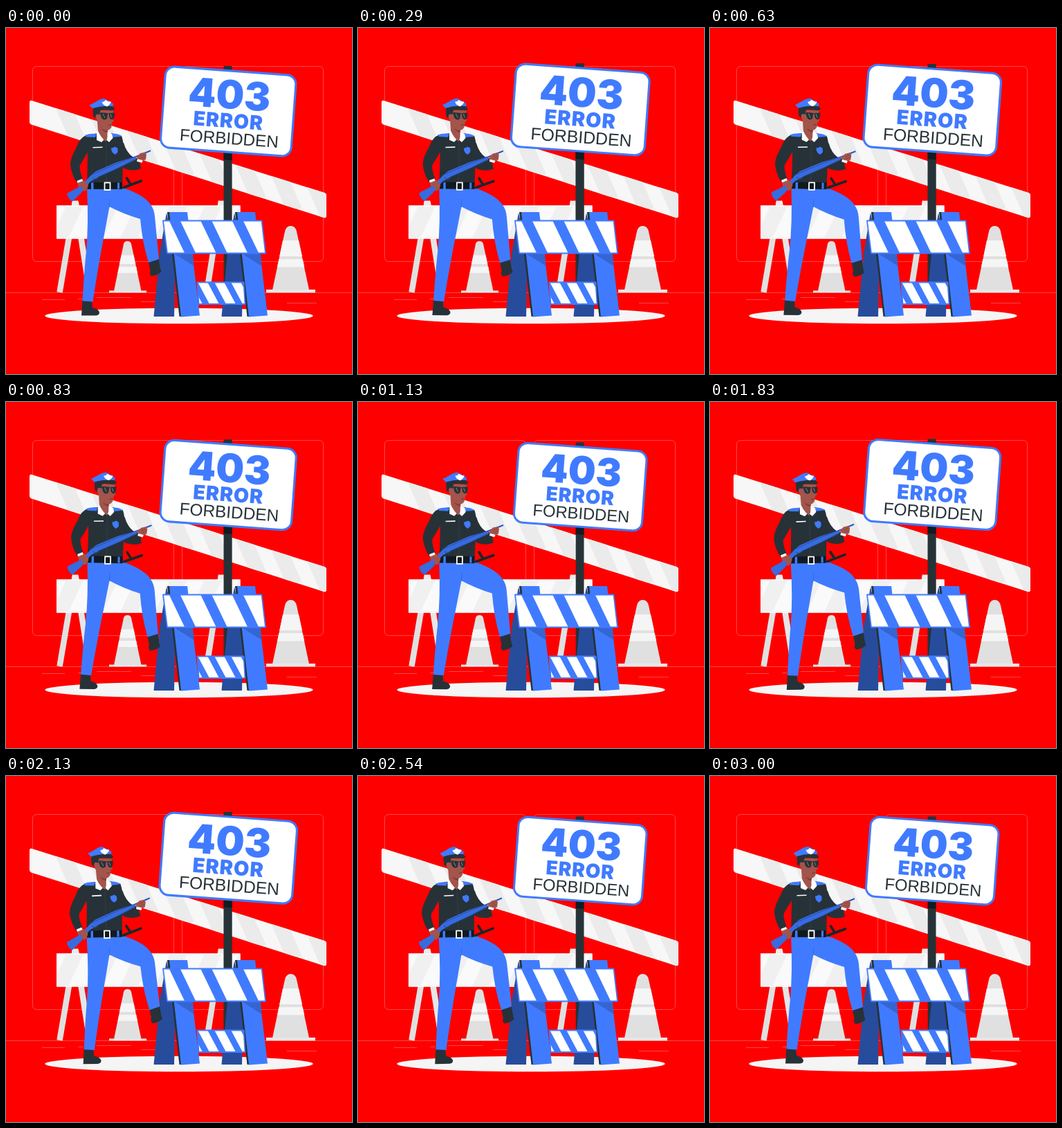
Animation of 500 by 500 pixels, one loop 3.04 s. Source, as an HTML page with a canvas:

```html
<!DOCTYPE html>
<html lang="en">
<head>
<meta charset="utf-8">
<title>403 Error Forbidden</title>
<style>
html, body { margin: 0; width: 100%; height: 100%; overflow: hidden; background: #f00; }
canvas { display: block; width: 100vw; height: 100vh; }
</style>
</head>
<body>
<canvas id="stage" width="500" height="500"></canvas>
<script>
const ctx = document.getElementById('stage').getContext('2d');
const BLUE = '#407bff', NAVY = '#284c9c', SHADE = '#3565d0', DARK = '#263238', SKIN = '#a3544b';
const PALE = '#f7f7f7', GREY = '#ebebeb', WHITE = '#fff';
const FRAME = 1000 / 24, LOOP = 3040;

function fill(color, d) {
  ctx.fillStyle = color;
  ctx.fill(new Path2D(d));
}

function line(color, width, d, cap = 'butt') {
  ctx.strokeStyle = color;
  ctx.lineWidth = width;
  ctx.lineCap = cap;
  ctx.lineJoin = 'round';
  ctx.stroke(new Path2D(d));
}

function clipped(d, draw) {
  ctx.save();
  ctx.clip(new Path2D(d));
  draw();
  ctx.restore();
}

// Slanted bands starting at x, one every `step`
function bands(color, x, step, count, width, top, bottom, lean, drop = 0) {
  for (let i = 0; i < count; i++) {
    const a = x + i * step, y = i * step * drop;
    fill(color, `M${a},${top + y} h${width} L${a + width + lean},${bottom + y} h${-width}Z`);
  }
}

function around(x, y, draw, scale, angle) {
  ctx.save();
  ctx.translate(x, y);
  ctx.rotate(angle * Math.PI / 180);
  ctx.scale(scale, scale);
  ctx.translate(-x, -y);
  draw();
  ctx.restore();
}

// Piecewise linear value through [position, value] stops
function tween(stops, p) {
  for (let i = 1; i < stops.length; i++) {
    const [p0, v0] = stops[i - 1], [p1, v1] = stops[i];
    if (p <= p1) return v0 + (v1 - v0) * (p - p0) / (p1 - p0);
  }
  return stops[stops.length - 1][1];
}

function backdrop() {
  ctx.fillStyle = '#f00';
  ctx.fillRect(0, 0, 500, 500);
  ctx.strokeStyle = 'rgba(235,235,235,.3)';
  ctx.lineWidth = 1;
  for (const x of [38.5, 254.5]) {
    ctx.beginPath();
    ctx.roundRect(x, 55.5, 204, 282, 5.5);
    ctx.stroke();
  }
  line('rgba(235,235,235,.3)', 1,
    'M0,382.5H500M52,392.5h33M104,391.5h7M131,389.5h50M195,395.5h36M406,397.5h43');
  fill('#f5f5f5', 'M56.2,416a193.8,11.3 0 1 0 387.6,0a193.8,11.3 0 1 0 -387.6,0Z');
}

function boom() {
  const shape = 'M37.5,105 L460,238 Q463,239 463,242 V271 Q463,275 459,274 L36.5,139.5 Q34,138.5 34,136 V108 Q34,104 37.5,105Z';
  fill(PALE, shape);
  clipped(shape, () => bands(GREY, 70, 52, 8, 24, 112, 162, 22, .317));
}

function backBarrier() {
  line('#e0e0e0', 8.5, 'M100,250L77.5,382M311,250L290,382');
  line('#e6e6e6', 8.5, 'M100,250L121,382M311,250L333,382');
  fill(GREY, 'M95.7,251q4,-3 9,0l2,9h-11ZM306.7,251q4,-3 9,0l2,9h-11Z');
  fill('#f0f0f0', 'M73,256.5H338.5V304.5H73Z');
  clipped('M75,258.5H336.5V302.5H75Z', () => bands('#fafafa', 62, 50, 6, 25, 257, 304, -22));
  line('#fafafa', 1.5, 'M73.8,257.2H337.8V303.8H73.8Z');
}

function cones() {
  fill('#e0e0e0', 'M156,380L170,312Q171,308 175.5,308Q180,308 181,312L195.5,380Z');
  fill('#f5f5f5', 'M166.5,328.5H184.6L187.2,341H164ZM163.3,345H188.2L190,354H161.5Z');
  fill('#e6e6e6', 'M149,379.5H203V382.5H149Z');
  fill('#e0e0e0', 'M385,378.5L403,294Q405,286 411.5,286Q418,286 420,294L438,378.5Z');
  fill('#f5f5f5', 'M400,307H423L428,330H395.2ZM394.4,334H428.8L431.2,345.5H392Z');
  fill('#e6e6e6', 'M376,378H447V382.5H376Z');
}

function sign() {
  fill(DARK, 'M314.7,58.5H326.5V408.5H314.7Z');
  fill('#141b1f', 'M314.7,175H326.5V192L314.7,191Z');
  ctx.save();
  ctx.translate(321.2, 122.7);
  ctx.rotate(4.15 * Math.PI / 180);
  ctx.beginPath();
  ctx.roundRect(-92.7, -57.5, 185.4, 115, 13);
  ctx.fillStyle = WHITE;
  ctx.fill();
  ctx.strokeStyle = BLUE;
  ctx.lineWidth = 3;
  ctx.stroke();
  ctx.textAlign = 'center';
  label('403', BLUE, '900 56px Inter, sans-serif', 0, -4, '0px');
  label('ERROR', BLUE, '900 28px Inter, sans-serif', 1, 23, '.9px');
  label('FORBIDDEN', DARK, '23.8px "Liberation Sans", Arial, sans-serif', 4, 46.2, '0px');
  ctx.restore();
}

function label(text, color, font, x, y, spacing) {
  ctx.font = font;
  ctx.letterSpacing = spacing;
  ctx.fillStyle = color;
  ctx.fillText(text, x, y);
}

function trestle(dx) {
  ctx.save();
  ctx.translate(dx, 0);
  fill(NAVY, 'M232,267L245,326L243,417H213.5L222,326Z');
  fill(DARK, 'M233,266H237L254,417H250.5Z');
  fill(BLUE, 'M236,266H262L280,415.5L253,417.5Z');
  fill(SHADE, 'M243,326H270L271.5,344Z');
  ctx.restore();
}

function plank(shape, x, step, count, width, top, bottom, lean) {
  fill(WHITE, shape);
  clipped(shape, () => bands(BLUE, x, step, count, width, top, bottom, lean));
  line(BLUE, 1.8, shape);
}

function barrier() {
  trestle(98);
  plank('M276.5,367.5H343.5L345.5,399H278.5Z', 267, 24, 4, 10, 367, 399, 17);
  trestle(0);
  plank('M227,278.5H369.5L375,325.5H233Z', 235.5, 45.5, 3, 16, 278, 326, 23);
}

function legs() {
  fill(DARK, 'M206,338L221,334Q222,346 224.5,352Q220,357 210.5,358.5Q206.5,356 208.5,350Z');
  fill(DARK, 'M110.5,393L124,394L125,404Q134,406 135,411Q135,415 130,415.5H109Z');
  fill(BLUE, 'M150,231H169Q199,241 208,254Q214,261 215,272L221,334L206,339Q197,310 194,276Q170,269 149,258Z');
  fill(BLUE, 'M117,231H157L149.5,258Q144,288 138,320Q130,365 125.5,395.5L110.5,394.5Q113,350 116,322Q119.5,282 117,231Z');
  line('#3265d8', .8, 'M150,247Q149,253 149.5,259');
}

function torso() {
  fill(DARK, 'M115,155L133,152H152L167,156Q172,169 169,196L168,233H117L118,186Z');
  fill(DARK, 'M116,155Q107,158 102,172Q93,188 93,197Q94,210 102,223L111,219Q106,206 106.5,199Q114,187 120,175Z');
  line('#3a474d', .6, 'M145,164V222');
  fill(BLUE, 'M114,155Q121,152 131,153L129,158L116,157.5ZM152,152.5Q162,152 168,156.5L154,158Z');
  line(WHITE, 1.6, 'M125.5,172.8L139.5,172.3');
  fill(BLUE, 'M157.5,171.5Q160,173.5 163,173.5Q163,180 157.5,183Q152,180 152,173.5Q155,173.5 157.5,171.5Z');
  fill('#111a1f', 'M117,223H168V232.5H117Z');
  fill(BLUE, 'M123,223.5h3.5v10h-3.5ZM161,223.5h3v9h-3Z');
  line(WHITE, 1.8, 'M142.5,223.5H150.5V234H142.5Z');
  line('#1b252a', 3.6, 'M170,230.5L195.5,221M174.5,217L180.5,226.5', 'round');
}

function head() {
  fill(WHITE, 'M131,149L147,150L153,153L154.5,159L149,165L143,160L138,165L131,162Z');
  fill(SKIN, 'M132,136L147,142L146.5,154Q147,160 144,164Q137,158 133,149Z');
  fill('#82403a', 'M138,146L147,147L146.5,151Q142,151 138,146Z');
  fill(SKIN, 'M131,119H155L154.5,128L156,134L153.5,136L152.5,143Q150,148 145,148Q138,147 135,140L131,134Z');
  fill(DARK, 'M125.5,118L137,117L135,125L133.5,130Q128,131 126,127Z');
  fill(SKIN, 'M129.5,128a3,3.6 0 1 0 6,0a3,3.6 0 1 0 -6,0Z');
  line(DARK, 1, 'M133,124H156');
  fill(DARK, 'M136,122L147,123L146,131Q141,135 137.5,129ZM149,123L157,122.5Q157.5,130 154,132.5Q150,132 149,128Z');
  line('#73858e', 1, 'M140,124L143,130M151,124.5L153,129.5');
  line('#6d302d', .9, 'M147.5,140.5L152,139.5');
  fill(BLUE, 'M120.5,111.5Q126,109 131,106Q137,102 142,102Q150,105.5 155,109.5L154,116L127,118Z');
  fill(DARK, 'M125.5,116Q140,111.5 154,113L157.5,116.5Q156,120 151,119Q138,117 126.5,120.5Z');
  fill(WHITE, 'M138.5,107Q142,107 144,104Q148,107 152,106.5Q150.5,111 146,113.5Q140.5,112 138.5,107Z');
}

function shotgun() {
  fill(DARK, 'M160,163L170,166Q174,180 184,187L192,190L195,203Q184,208 171,203Q165,198 163,190Z');
  fill(SKIN, 'M103,222L110,219L118,224Q119,231 114,236Q107,235 105,230Z');
  fill('#376be0', 'M88,239L105,230L119,217Q122,213 130,207L160,194L186,186L188,190L163,202L134,215L122,222L108,239L96,250.5Q90,248 88,239Z');
  line('#376be0', 2.2, 'M184,188L209,177.3');
  line('#23479c', .8, 'M124,212L160,196L209,177M134,215L163,202L186,190');
  line('#23479c', 1, 'M125,216q4,6 9,-1');
  fill(SKIN, 'M189,186L194,181L201,179.5L203,183L202,190L196,194L190,192Z');
  line('#7f3e38', .7, 'M194,185L201,182.5M195,188L202,186');
  fill(SKIN, 'M108,224L115,222L119,227L117,234L109,232Z');
  line(WHITE, 3.5, 'M103,222.5L110.5,219.5M189.5,191L197,193');
}

function man() {
  legs();
  torso();
  head();
  shotgun();
}

const BEAT = [[0, 1], [.1, 1.1], [.3, 1], [.4, 1], [.5, 1.1], [.6, 1], [1, 1]];

function draw(t) {
  const time = Math.floor((t % LOOP + 5) / FRAME) * FRAME;
  // The last beat ends at rest and starts anew with the loop
  const scale = time > 2700 ? 1 : tween(BEAT, (time + 30) / 1500 % 1);
  const angle = Math.sin(time / 3000 * 2 * Math.PI);
  backdrop();
  boom();
  backBarrier();
  cones();
  around(321, 233, sign, scale, 0);
  barrier();
  around(156, 259, man, 1, angle);
}

const start = performance.now();
function tick() {
  draw(performance.now() - start);
  requestAnimationFrame(tick);
}
tick();
</script>
</body>
</html>
```
